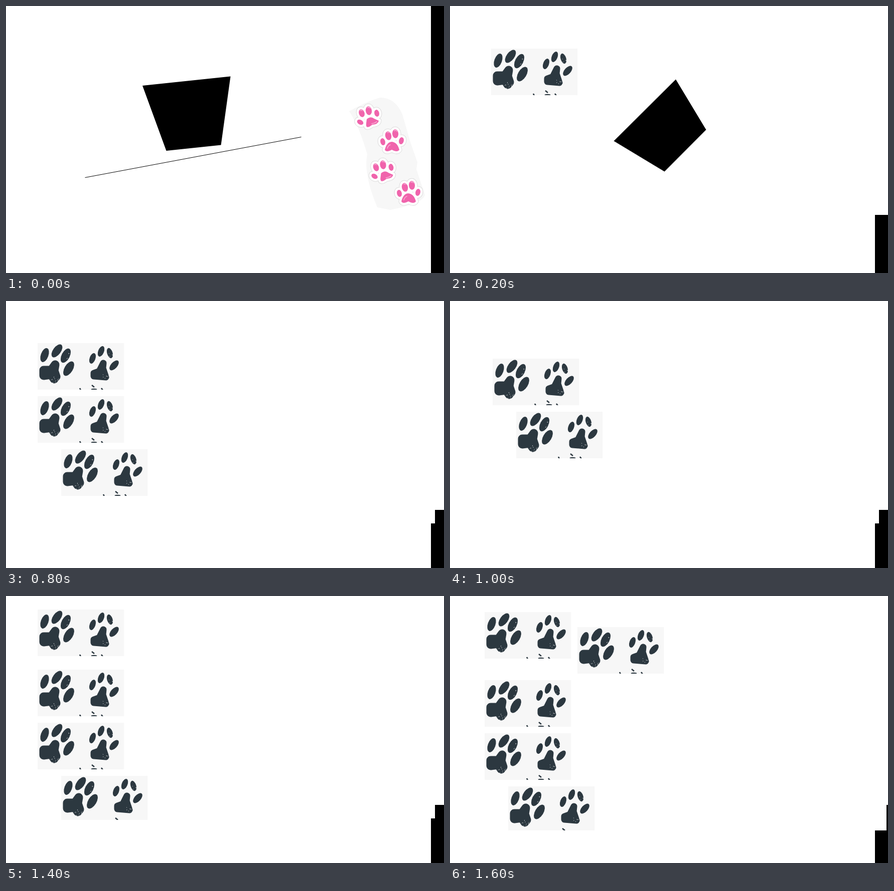
Animation of 873x533 px, one loop 2.2 s. Source, as an HTML page:

```html
<!DOCTYPE html>
<html lang="en">
<head>
<meta charset="utf-8">
<title>Paw prints</title>
<style>
html, body { margin: 0; width: 100%; height: 100%; overflow: hidden; background: #fff; }
svg { display: block; width: 873px; height: 533px; }

.scene { visibility: hidden; animation: 2200ms step-end infinite; }
.tilt  { animation-name: tilt; }
.turn  { animation-name: turn; }
.two   { animation-name: two; }
.three { animation-name: three; }
.four  { animation-name: four; }
.five  { animation-name: five; }
@keyframes tilt  { 0% { visibility: visible } 9.0909% { visibility: hidden } }
@keyframes turn  { 9.0909% { visibility: visible } 27.2727% { visibility: hidden } }
@keyframes two   { 27.2727%, 45.4545% { visibility: visible } 36.3636%, 54.5454% { visibility: hidden } }
@keyframes three { 36.3636%, 54.5454% { visibility: visible } 45.4545%, 63.6363% { visibility: hidden } }
@keyframes four  { 63.6363% { visibility: visible } 72.7272% { visibility: hidden } }
@keyframes five  { 0% { visibility: hidden } 72.7272%, 100% { visibility: visible } }

.paper { fill: #f7f7f7; }
.ink   { fill: #2c3840; stroke-linejoin: round; }
.pad, .mark { stroke: #2c3840; }
.mark  { fill: none; stroke-width: 2.6; }
.rim   { fill: #dcdcdc; stroke: #dcdcdc; stroke-width: 11; stroke-linejoin: round; }
.white { fill: #fff; stroke: #fff; stroke-width: 9; stroke-linejoin: round; }
.pink  { fill: #f064ac; }
.shine { fill: none; stroke: #f9a9d3; stroke-width: 1.6; stroke-linecap: round; }
</style>
</head>
<body>
<svg viewBox="0 0 873 533">
<defs>
  <!-- unit toes, placed by position, tilt and length -->
  <ellipse id="toe" rx=".52" ry="1"/>
  <ellipse id="bean" rx=".69" ry="1" vector-effect="non-scaling-stroke"/>

  <symbol id="card" width="172.5" height="93">
    <rect class="paper" width="172.5" height="93"/>
    <g class="ink">
      <use href="#toe" transform="translate(14 24) rotate(20) scale(14.5)"/>
      <use href="#toe" transform="translate(38.5 15.5) rotate(36) scale(15)"/>
      <use href="#toe" transform="translate(56 25) rotate(27) scale(15.5)"/>
      <use href="#toe" transform="translate(62 51) rotate(31) scale(16)"/>
      <path class="pad" stroke-width="17" d="M35 43L27 54 12 54 12 65 27 63 33 72 37 67 33 55z"/>

      <use href="#toe" transform="translate(109.5 30.5) rotate(20) scale(11)"/>
      <use href="#toe" transform="translate(126.5 16.5) rotate(22) scale(11)"/>
      <use href="#toe" transform="translate(144 20) rotate(-18) scale(10.5)"/>
      <use href="#toe" transform="translate(152.5 44.5) rotate(42) scale(12)"/>
      <path class="pad" stroke-width="13" d="M131 40L130 50 136 68 112 66 112 60 123 56z"/>
    </g>
    <path class="mark" d="M84 90l2 4M108 84l5 4M107 93q5-2 11 0M127 90l3 4"/>
    <path id="flecks" fill="#f0f1f2"/>
  </symbol>
  <g id="pair">
    <use href="#card"/>
    <use href="#card" x="47" y="106"/>
  </g>
  <symbol id="cutPair" width="220" height="194"><use href="#pair"/></symbol>

  <g id="leanShape">
    <use href="#bean" transform="translate(709 214) rotate(-20) scale(8)"/>
    <use href="#bean" transform="translate(723 209) rotate(-8) scale(8.8)"/>
    <use href="#bean" transform="translate(739 214) rotate(-12) scale(7)"/>
    <use href="#bean" transform="translate(706 232) rotate(-60) scale(6.7)"/>
    <path d="M719 226Q727 219 734 225L743 229Q742 236 730 237 716 248 718 234z"/>
  </g>
  <g id="uprightShape">
    <use href="#bean" transform="translate(762 259) rotate(-12) scale(8.8)"/>
    <use href="#bean" transform="translate(776 255) rotate(-4) scale(8.8)"/>
    <use href="#bean" transform="translate(751 271) rotate(-15) scale(7)"/>
    <use href="#bean" transform="translate(788 269) rotate(15) scale(7)"/>
    <path d="M755 287Q759 271 769 271 780 272 784 287 780 293 769 287 758 293 755 287z"/>
  </g>
  <g id="lean">
    <use href="#leanShape" class="rim"/>
    <use href="#leanShape" class="white"/>
    <use href="#leanShape" class="pink"/>
    <path class="shine" d="M706 209q2-2 4 0M721 203q3-2 5 1M729 235q6-1 10-4"/>
  </g>
  <g id="upright">
    <use href="#uprightShape" class="rim"/>
    <use href="#uprightShape" class="white"/>
    <use href="#uprightShape" class="pink"/>
    <path class="shine" d="M760 253q2-2 4 0M774 249q3-2 5 1M760 284q2-6 6-7"/>
  </g>

  <path id="bar" d="M855 417h18v116h-26v-89h8z"/>
</defs>

<g class="scene tilt">
  <path d="M272 159L447.5 140.5 428.5 277.5 319.5 289z"/>
  <path d="M157.5 342.5L588.5 261.5" stroke="#000"/>
  <path class="paper" d="M684 210Q720 190 745 183 775 182 790 216L806 272 820 312 818 326 835 377Q832 394 766 407L740 402Q712 335 720 296 704 240 684 210z"/>
  <use href="#lean"/>
  <use href="#upright"/>
  <use href="#lean" x="28.5" y="108"/>
  <use href="#upright" x="33" y="103"/>
  <path d="M847 0h26v533h-26z"/>
</g>

<g class="scene turn">
  <path d="M450 146.5L510.5 247 427.5 330.5 326.5 269.5z"/>
  <use href="#card" x="82" y="85"/>
  <path d="M847 417h26v116h-26z"/>
</g>

<g class="scene two">
  <use href="#pair" x="85" y="115"/>
  <use href="#bar"/>
</g>

<g class="scene three">
  <use href="#card" x="63" y="84"/>
  <use href="#pair" x="63" y="190"/>
  <use href="#bar"/>
</g>

<g class="scene four">
  <use href="#card" x="63" y="27"/>
  <use href="#card" x="63" y="147"/>
  <use href="#cutPair" x="63" y="253"/>
  <use href="#bar"/>
</g>

<g class="scene five">
  <use href="#card" x="69" y="32"/>
  <use href="#card" x="254" y="62"/>
  <use href="#card" x="69" y="168"/>
  <use href="#cutPair" x="69" y="274"/>
  <path d="M870 417h3v116h-26v-65h23z"/>
</g>
</svg>
<script>
// Small gaps in the ink, scattered around a centre
let seed = 11;
const rand = () => (seed = seed * 16807 % 2147483647) / 2147483647;
function scatter(x, y, spread, count) {
  const near = v => v + (rand() - .5) * 2 * spread;
  return Array.from({ length: count }, () =>
    `M${near(x)} ${near(y)}h${.6 + rand()}v${.6 + rand()}h-1z`).join('');
}
document.getElementById('flecks').setAttribute('d',
  scatter(34, 74, 8, 12) + scatter(60, 26, 6, 6) + scatter(136, 69, 7, 9) + scatter(146, 24, 4, 4));
</script>
</body>
</html>
```
